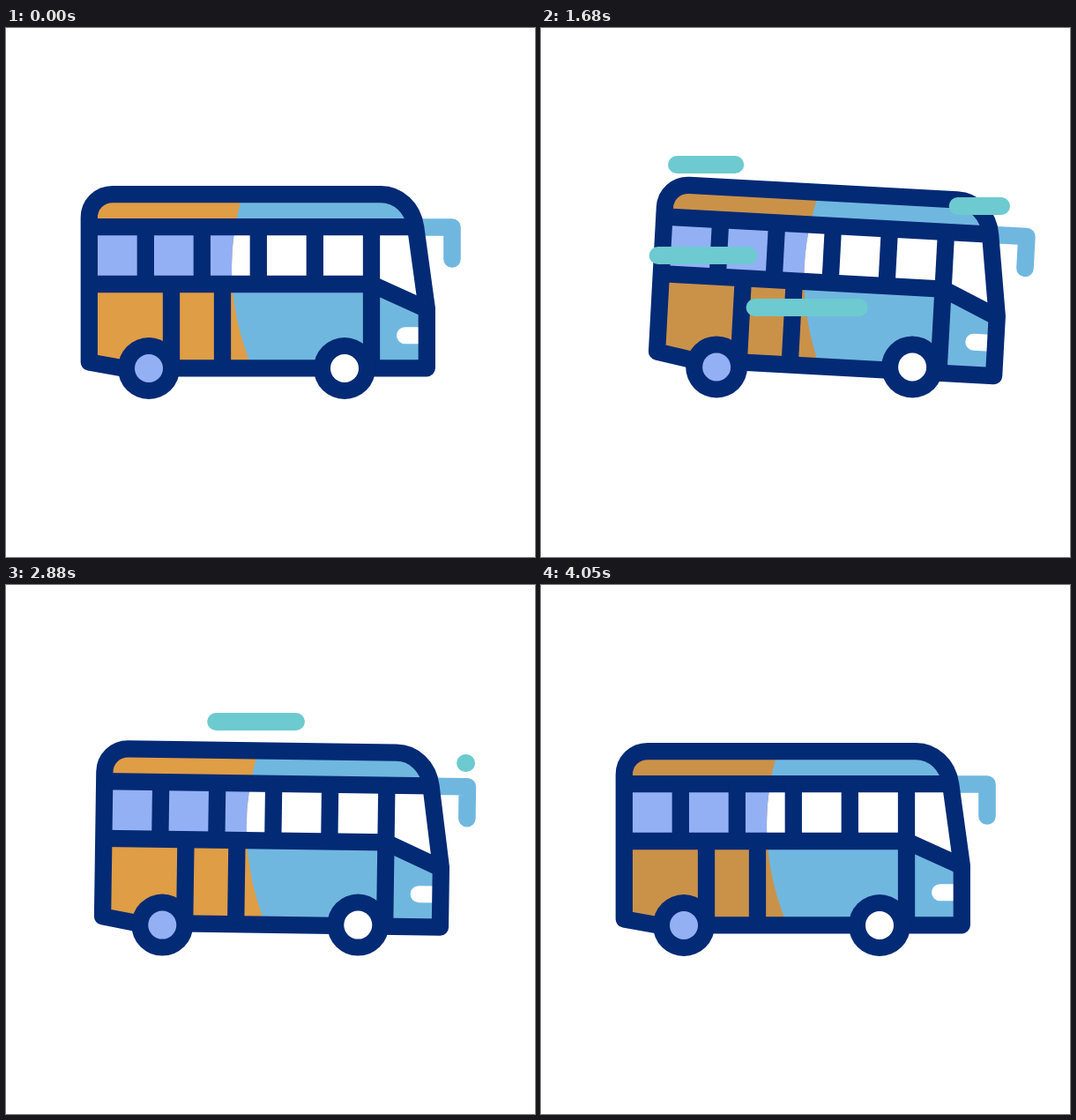
Recreate the animation shown at these times as an HTML page with a canvas. Size 600 by 600 pixels, loop 4.2 s.

```html
<!DOCTYPE html>
<html lang="en">
<head>
<meta charset="utf-8">
<title>Bus</title>
<style>
  html, body { margin: 0; width: 100%; height: 100%; overflow: hidden; background: #fff; }
  canvas { display: block; width: 600px; height: 600px; }
</style>
</head>
<body>
<canvas id="stage" width="600" height="600"></canvas>
<script>
const ctx = document.getElementById('stage').getContext('2d');
const LOOP = 4200, STEP = 30, LINE = 19.3;
const NAVY = '#032a75', BLUE = '#70b7e0', PERI = '#93b0f5', WHITE = '#fff', TEAL = '#6ccad0';
const ORANGE = '#df9d45', OCHRE = '#ca9249';
const SIDE = 94.3, ROOF = 188.6, RAIL = 225.7, SILL = 290.5, FLOOR = 385.8, PILLAR = 414.5, NOSE = 477.3;
const STREAK_TRAVEL = 750, TAIL_DELAY = 300;

// Smooth rise from 0 to 1 between two times
function ramp(t, from, to) {
  const u = Math.min(1, Math.max(0, (t - from) / (to - from)));
  return u * u * (3 - 2 * u);
}

// Back up, surge forward, fall back past the middle, settle
function shiftAt(t) {
  return -21 * ramp(t, 300, 940) + 84.2 * ramp(t, 940, 2115)
    - 81.2 * ramp(t, 2115, 3480) + 18 * ramp(t, 3480, 4050);
}

// Tilt in degrees, nose down is positive
function leanAt(t) {
  return -2.5 * ramp(t, 300, 850) + 5.6 * ramp(t, 850, 1560)
    - 2.7 * ramp(t, 2050, 3150) + 1.35 * ramp(t, 3150, 3600) - 1.75 * ramp(t, 3600, 4050);
}

function shell() {
  const p = new Path2D();
  p.moveTo(SIDE, 379);
  p.lineTo(SIDE, 215);
  p.bezierCurveTo(SIDE, 200, 106, ROOF, 121, ROOF);
  p.lineTo(425, ROOF);
  p.bezierCurveTo(445, ROOF, 461.5, 204, 464.6, RAIL);
  p.lineTo(NOSE, 318);
  p.lineTo(NOSE, FLOOR);
  p.lineTo(132, FLOOR);
  p.closePath();
  return p;
}

function rear() {
  const p = new Path2D();
  p.moveTo(80, 180);
  p.lineTo(271.2, 180);
  p.quadraticCurveTo(236.4, 285, 281, 390);
  p.lineTo(80, 390);
  p.closePath();
  return p;
}

const SHELL = shell(), REAR = rear();

function line(color, width, cap, ...points) {
  ctx.strokeStyle = color;
  ctx.lineWidth = width;
  ctx.lineCap = cap;
  ctx.beginPath();
  points.forEach(([x, y]) => ctx.lineTo(x, y));
  ctx.stroke();
}

function bar(...points) {
  line(NAVY, LINE, 'butt', ...points);
}

function rect(color, x, y, w, h) {
  ctx.fillStyle = color;
  ctx.fillRect(x, y, w, h);
}

function disc(color, x, y, r) {
  ctx.fillStyle = color;
  ctx.beginPath();
  ctx.arc(x, y, r, 0, Math.PI * 2);
  ctx.fill();
}

function drawPaint(orange) {
  ctx.save();
  ctx.clip(SHELL);
  rect(BLUE, 80, 170, 420, 230);
  rect(WHITE, 80, RAIL, PILLAR - 80, SILL - RAIL);
  ctx.fillStyle = WHITE;
  ctx.beginPath();
  ctx.moveTo(PILLAR, RAIL);
  ctx.lineTo(490, RAIL);
  ctx.lineTo(490, 325);
  ctx.lineTo(PILLAR, SILL);
  ctx.fill();
  line(WHITE, 19, 'round', [452.5, 348.7], [485, 348.7]);
  ctx.clip(REAR);
  rect(orange, 80, 170, 220, 230);
  rect(PERI, 80, RAIL, 220, SILL - RAIL);
  ctx.restore();
}

function drawBody(orange) {
  line(BLUE, 19.6, 'round', [468, 226], [506, 226], [506, 262]);
  drawPaint(orange);
  ctx.strokeStyle = NAVY;
  ctx.lineWidth = LINE;
  ctx.stroke(SHELL);
  bar([SIDE, RAIL], [464.6, RAIL]);
  bar([SIDE, SILL], [PILLAR, SILL], [NOSE, 319]);
  for (let i = 1; i <= 4; i++) bar([SIDE + 64 * i, RAIL], [SIDE + 64 * i, SILL]);
  for (const x of [187.5, 245.5]) bar([x, SILL], [x, FLOOR]);
  bar([PILLAR, RAIL], [PILLAR, FLOOR]);
}

function drawWheel(x, hub) {
  disc(NAVY, x, 386, 35);
  disc(hub, x, 386, 16);
}

function drawBus(t) {
  const dx = shiftAt(t), lean = leanAt(t);
  const bright = t < 330 || (t >= 2850 && t < 4050);
  ctx.save();
  ctx.translate(dx + 286, 376 - 0.5 * Math.max(0, lean));
  ctx.rotate(lean * Math.PI / 180);
  ctx.translate(-286, -376);
  drawBody(bright ? ORANGE : OCHRE);
  ctx.restore();

  ctx.save();
  ctx.translate(dx, -0.5 * lean);
  drawWheel(162, PERI);
  drawWheel(384, WHITE);
  ctx.restore();
}

// A streak grows leftwards from its head, then its tail catches up
function drawStreak(age, y, right, reach) {
  if (age < 0 || age >= STREAK_TRAVEL + TAIL_DELAY) return;
  const head = right - reach * ramp(age, 0, STREAK_TRAVEL);
  const tail = right - reach * ramp(age - TAIL_DELAY, 0, STREAK_TRAVEL);
  line(TEAL, 20, 'round', [head, y], [tail + 0.01, y]);
}

function drawStreaks(t) {
  drawStreak(t - 308, 365, 480, 90);
  drawStreak(t - 602, 349, 238, 186);
  drawStreak(t - 1265, 258, 248, 199);
  for (const start of [935, 2485]) drawStreak(t - start, 155, 337, 183);
  for (const start of [1084, 1740]) drawStreak(t - start, 317, 435, 216);
  for (const start of [1435, 2850]) drawStreak(t - start, 202, 522, 197);
}

function draw(t) {
  ctx.lineJoin = 'round';
  rect(WHITE, 0, 0, 600, 600);
  drawBus(t);
  drawStreaks(t);
}

const began = performance.now();
function tick() {
  const t = (performance.now() - began) % LOOP;
  draw(Math.floor(t / STEP) * STEP);
  requestAnimationFrame(tick);
}
tick();
</script>
</body>
</html>
```
